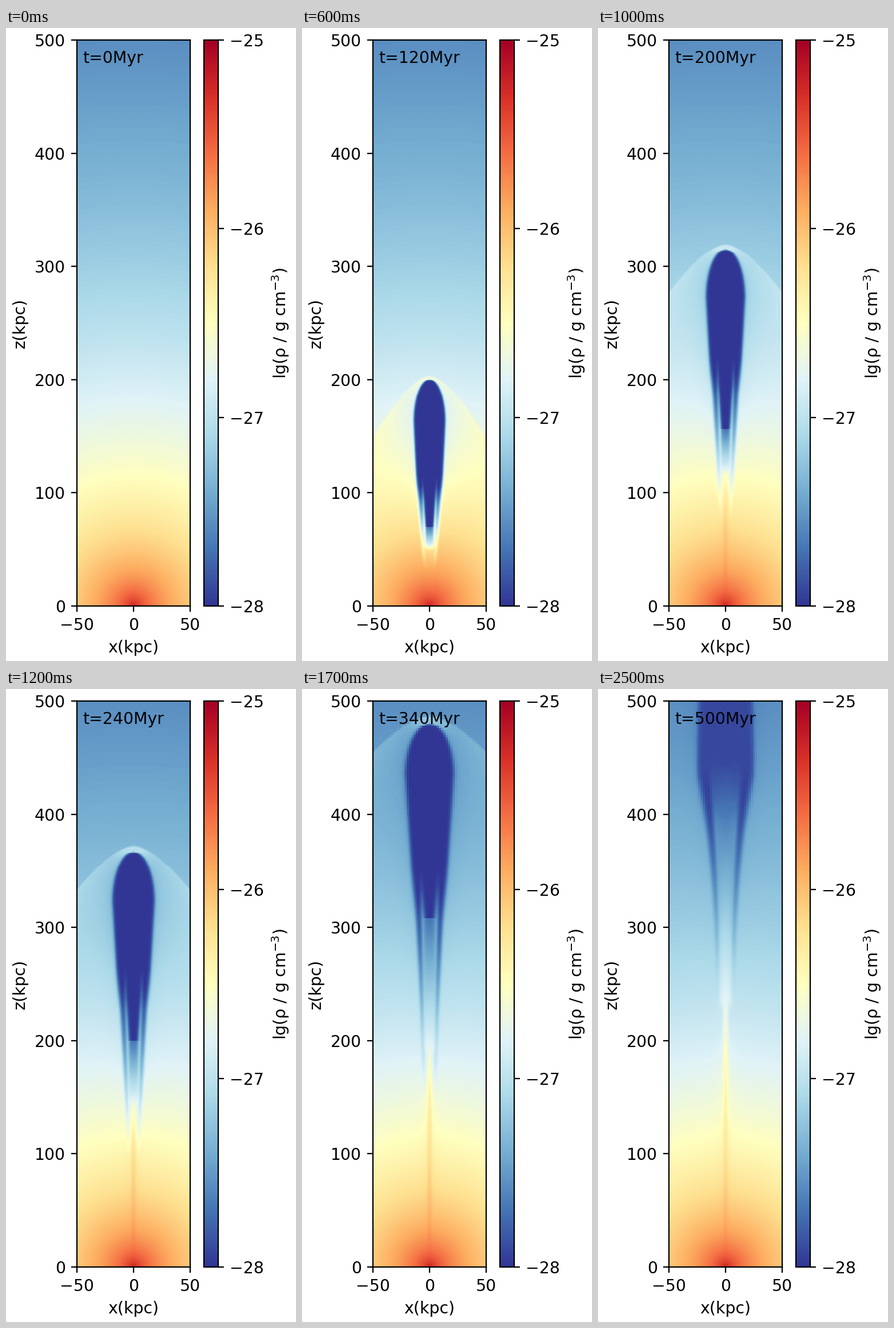
Write a matplotlib script that moves like this. It is 507x1105 px and loops after 2.6 s.

```python
import numpy as np
import matplotlib.pyplot as plt
from matplotlib.animation import FuncAnimation

W, H, DPI = 507, 1105, 200
FRAMES, STEP = 26, 20          # 20 Myr per frame
VMIN, VMAX = -28, -25
K = 1.022                      # text and tick scale


def sig(x):
    return 1 / (1 + np.exp(-np.clip(2 * x, -40, 40)))


def smooth(x):
    x = np.clip(x, 0, 1)
    return x * x * (3 - 2 * x)


def bell(x, width):
    return np.exp(-(x / width) ** 2)


def mix(a, b, k):
    return a + (b - a) * k


def hill(t, start, limit, half):
    """Rise from zero at start, levelling off towards limit."""
    x = max(t - start, 0) ** 1.5
    return limit * x / (x + half)


# Undisturbed gas: 0..1 on the colour scale, smooth in log radius
RADII = np.array([0, 10, 30, 50, 110, 190, 270, 400, 500])
LEVELS = [.93, .82, .71, .655, .5, .4, .305, .205, .148]
PROFILE = np.polyfit(np.log1p(RADII / 10), LEVELS, 4)

xs = (np.arange(198) + .5) / 198 * 100 - 50
zs = (np.arange(988) + .5) / 988 * 500
X0, Z0 = np.meshgrid(xs, zs)
AMBIENT = np.polyval(PROFILE, np.log1p(np.hypot(X0, Z0) / 10))

# The grid gets coarser with height
CELL = np.where(Z0 > 400, 2.0, np.where(Z0 > 200, 1.0, .5))
X = np.abs((np.floor(X0 / CELL) + .5) * CELL)
Z = (np.floor(Z0 / CELL) + .5) * CELL


def lobe_width(t, top, mid, foot):
    wide = 11.4 * (t / 80) ** .4
    narrow = 2.5 + .012 * t
    cap = np.clip((Z - mid) / (top - mid), 0, 1)
    u = np.clip((Z - foot) / (mid - foot), 0, 1)
    tail = narrow + (wide - narrow) * u ** (.4 * (t / 80) ** .9)
    return np.where(Z > mid, wide * np.sqrt(1 - cap ** 2), tail)


def density(t):
    if t == 0:
        return AMBIENT

    shock = 1.83 * t - .00117 * t ** 2             # bow shock apex
    top = shock - t / 45                           # lobe apex
    mid = min(top - 45 * (1 - np.exp(-t / 70)), 435)
    foot = max(.52 * (t - 60), 0)                  # lower end of the strips
    full = hill(t, 20, 620, 4829)                  # lobe is solid above this
    head = hill(t, 50, 300, 2826)                  # top of the lifted stem
    core = max(min(1.08 * (t - 55), full + 20), head + 1)
    w = lobe_width(t, top, mid, foot)
    edge = .7 + t / 300
    young = bell(t - 80, 30)

    # shocked shell around the lobe
    d = shock - 600 / np.sqrt(t) * (X / 50) ** 1.6 - Z
    jump = .055 + .025 * young + .09 * bell(X, 13)
    shell = jump * np.exp(-np.clip(d, 0, None) / 38)
    dip = (.07 - .0001 * t) * np.exp(-np.clip(X - w, 0, None) / 10)
    dip *= smooth((Z - foot) / (mid - foot))
    v = AMBIENT + (shell - dip) * sig(d / .7)
    v += .04 * young * np.exp(-np.hypot(X, Z) / 18)

    # trailing strips that merge into the solid lobe
    ring = .75 * w
    strip = bell(X - ring, .26 * w + .3)
    strip = np.where(X < ring, np.maximum(strip, .4), strip)
    u = np.clip((Z - foot) / max(full - foot, 1), 0, 1)
    dark = .03 * np.clip((t - 420) / 80, 0, 1)
    fade = 15 + t / 8
    inner = AMBIENT * (1 - u ** 1.3 * strip)
    inner = mix(inner, dark, smooth((Z - full) / fade + .6))

    # core on the axis, brightening down to the stem
    k = np.clip((core - Z) / (core - head), 0, 1)
    start = dark + .1 * smooth((420 - t) / 80)
    val = np.where(Z > core, dark, mix(start, .42, k))
    half = 3.2 + .0035 * t + .06 * np.clip(Z - core, 0, 40)
    soft = .5 + t / 250
    inner = mix(inner, val, sig((half - X) / soft) * sig((Z - head) / (2 * soft)))

    v = mix(v, inner, sig((w + .5 * edge - X) / edge) * sig((top - Z) / .8))

    # dense stem drawn up behind the lobe
    lift = min(max(.0004 * (t - 80), 0), .09) - .1 * young
    rise = np.clip(Z / (.8 * head + 1), 0, 1)
    beam = bell(X, 2.2) + .25 * bell(X, 8) * smooth((head - Z) / 60)
    return v + lift * rise * beam * sig((head - Z) / (2 + t / 150))


def scaled(t):
    return VMIN + (VMAX - VMIN) * np.clip(density(t), 0, 1)


def box(left, top, right, bottom):
    return [left / W, 1 - bottom / H, (right - left) / W, (bottom - top) / H]


plt.rcParams.update({
    "font.family": "DejaVu Sans", "font.size": 10 * K,
    "axes.linewidth": .8 * K, "axes.labelpad": 4 * K,
})
for axis in ("xtick", "ytick"):
    plt.rcParams.update({f"{axis}.major.size": 3.5 * K, f"{axis}.major.pad": 3.5 * K,
                         f"{axis}.major.width": .8 * K})

fig = plt.figure(figsize=(W / DPI, H / DPI), dpi=DPI, facecolor="white")
ax = fig.add_axes(box(124, 21, 321.6, 1009))
im = ax.imshow(scaled(0), origin="lower", extent=(-50, 50, 0, 500), aspect="auto",
               cmap="RdYlBu_r", vmin=VMIN, vmax=VMAX)
ax.set_xticks([-50, 0, 50])
ax.set_yticks(range(0, 501, 100))
ax.set_xlabel("x(kpc)")
ax.set_ylabel("z(kpc)")
label = ax.text(-45, 480, "t=0Myr")

cax = fig.add_axes(box(346.3, 21, 371, 1009))
bar = fig.colorbar(im, cax=cax, ticks=range(VMIN, VMAX + 1))
bar.set_label("lg(ρ / g cm$^{-3}$)")


def update(i):
    t = i * STEP
    im.set_data(scaled(t))
    label.set_text(f"t={t}Myr")
    return im, label


anim = FuncAnimation(fig, update, frames=FRAMES, interval=100, repeat=True,
                     repeat_delay=0, blit=False)
plt.show()
```
